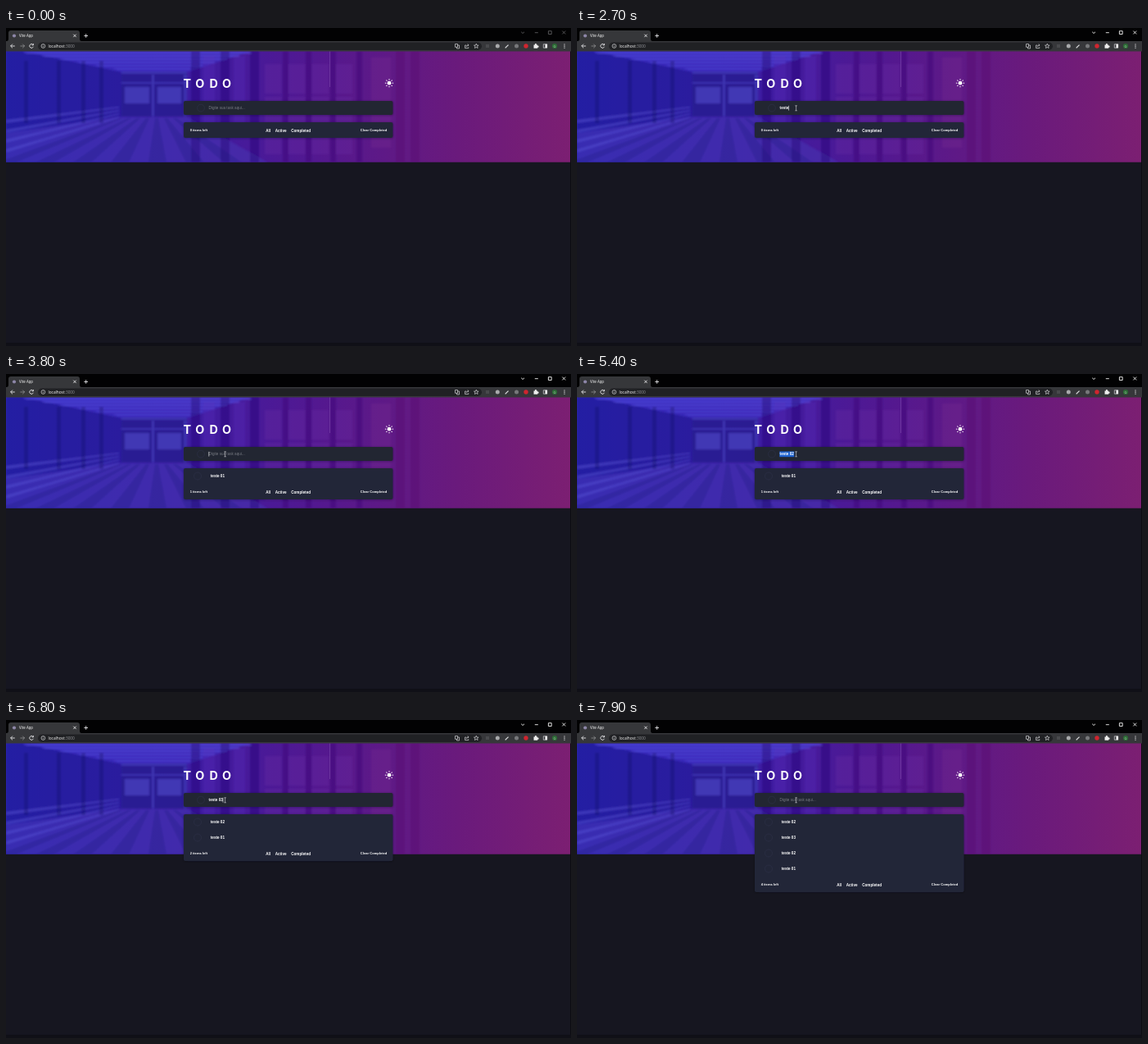
Write an HTML page that moves like this. It is 690x388 px and loops after 8 s.

```html
<!DOCTYPE html>
<html lang="en">
<head>
<meta charset="utf-8">
<title>Todo</title>
<style>
  html, body { margin: 0; height: 100%; overflow: hidden; background: #161620; }
  svg { display: block; width: 100vw; height: 100vh; }
  text { font: 700 4.62px "Liberation Sans", Arial, sans-serif; fill: #fff; white-space: pre; }
  .chrome text { font: 4.8px "Open Sans", sans-serif; }
  .line { fill: none; stroke: #e4e4e6; stroke-width: .9; }
  .small { font-size: 4.1px; }
  .ring { fill: none; stroke: #30334a; stroke-width: .6; }
  .title { font: 700 14.3px Inter, sans-serif; }
</style>
</head>
<body>
<svg viewBox="0 0 690 388" preserveAspectRatio="none">
  <defs>
    <linearGradient id="tint">
      <stop offset="0" stop-color="#2a21b0"/>
      <stop offset=".3" stop-color="#3b1ca4"/>
      <stop offset=".55" stop-color="#531890"/>
      <stop offset=".8" stop-color="#6a1a7c"/>
      <stop offset="1" stop-color="#7c1f72"/>
    </linearGradient>
    <filter id="soft"><feGaussianBlur stdDeviation=".8"/></filter>
    <filter id="shadow" x="-10%" y="-30%" width="120%" height="170%">
      <feDropShadow dx="0" dy=".5" stdDeviation="1.4" flood-color="#10101c" flood-opacity=".4"/>
    </filter>
    <clipPath id="hero"><path d="M0 28H690V163.7H0Z"/></clipPath>
  </defs>

  <rect width="690" height="388" fill="#161620"/>
  <rect y="384" width="690" height="4" fill="#101017"/>

  <g clip-path="url(#hero)">
    <rect y="28" width="690" height="136" fill="url(#tint)"/>
    <g id="hall" filter="url(#soft)"></g>
    <path d="M395.5 28V72" stroke="#a070c8" stroke-width=".7" opacity=".5"/>
  </g>
  <rect x="689" y="28" width="1" height="356" fill="#0c0c12"/>

  <g class="chrome">
    <rect width="690" height="16" fill="#020203"/>
    <path d="M1 16Q3 16 3 13V6Q3 3 6 3H87Q90 3 90 6V13Q90 16 92 16Z" fill="#36373a"/>
    <rect y="16" width="690" height="12.5" fill="#36373a"/>
    <rect x="39" y="17.5" width="542" height="9.4" rx="4.7" fill="#202124"/>
    <circle cx="10" cy="9.5" r="2.1" fill="#8d86a8"/>
    <text x="16" y="11.2" style="font-size:4.4px">Vite App</text>
    <path class="line" d="M82.3 7.7l3.4 3.4m0-3.4l-3.4 3.4"/>
    <path class="line" d="M10.8 22H5.6m2.4-2.4L5.6 22 8 24.4"/>
    <path class="line" stroke-opacity=".45" d="M17.4 22h5.2m-2.4-2.4l2.4 2.4-2.4 2.4"/>
    <path class="line" d="M33 20.4a2.4 2.4 0 1 0 .4 2.4M33.4 19v1.9h-1.9"/>
    <path class="line" d="M43 22a2.4 2.4 0 1 0 4.8 0a2.4 2.4 0 1 0-4.8 0M45.4 21.6v1.7m0-2.9v.5" style="stroke-width:.65"/>
    <text x="51.5" y="23.8">localhost<tspan fill="#96989c">:3000</tspan></text>
    <g class="line" style="stroke-width:.65">
      <path d="M548.5 19.5h3v3.8h-3zM551.5 21h2v4h-3v-1.7"/>
      <path d="M562 21h-1.4v3.6h4.2v-1.4m-2.8 0q0-2.4 3-2.4m-1.3-1.3l1.4 1.3-1.4 1.3"/>
      <path d="M574.3 19.2l.8 1.9 2 .1-1.5 1.3.5 2-1.8-1.1-1.8 1.1.5-2-1.5-1.3 2-.1z"/>
      <path d="M609.7 24.4l3.8-3.8" style="stroke-width:1.2"/>
      <path d="M656.3 19.8h4.4v4.4h-4.4z"/>
    </g>
    <path d="M658.5 19.8h2.2v4.4h-2.2z" fill="#fff"/>
    <rect x="586" y="20" width="4" height="4" fill="#48494c"/>
    <circle cx="600.3" cy="22" r="2.5" fill="#a9aaac"/>
    <circle cx="623.5" cy="22" r="2.5" fill="#77787b"/>
    <circle cx="635" cy="22" r="2.7" fill="#d0252f"/>
    <path d="M644.5 20.4h1.5a1 1 0 1 1 1.8 0h1.4v1.4a1 1 0 1 1 0 1.8v1.2h-4.7z" fill="#eee"/>
    <circle cx="670" cy="22" r="3.1" fill="#2c6b35"/>
    <text x="670" y="23.5" text-anchor="middle" style="font-size:4px;fill:#b9d8bc">G</text>
    <path d="M682 19.5v5.4" stroke="#eee" stroke-width="1.1" stroke-dasharray="1.1 1"/>
    <path class="line" d="M95.4 9.5h4.6m-2.3-2.3v4.6"/>
    <path id="controls" class="line" d="M629.2 4.8l1.9 1.7 1.9-1.7M645.8 5.7h4M662.4 3.7h3.8v3.8h-3.8zM679.4 3.6l3.8 3.8m0-3.8l-3.8 3.8"/>
  </g>

  <text class="title" x="216.5 231.2 248.6 264" y="73.2">TODO</text>
  <circle cx="468" cy="67.2" r="2.4" fill="#fff"/>
  <g id="rays" stroke="#fff" stroke-width="1"></g>

  <rect x="217" y="89" width="255.5" height="17" rx="2" fill="#222531" filter="url(#shadow)"/>
  <circle class="ring" cx="238" cy="97.6" r="4.4"/>
  <rect id="mark" x="247.3" y="94.4" height="6.8" fill="#1d62cf"/>
  <text id="entry" x="247.6" y="99.1"></text>
  <path id="caret" d="M0 94.8v5.8" stroke="#fff" stroke-width=".6"/>

  <rect id="card" x="217" y="115" width="255.5" rx="2" fill="#232639" filter="url(#shadow)"/>
  <g id="list"></g>
  <g id="footer">
    <text id="count" class="small" x="224.7" y="126"></text>
    <text x="317.2" y="127.2">All</text>
    <text x="328.7" y="127.2">Active</text>
    <text x="348.2" y="127.2">Completed</text>
    <text class="small" x="432.8" y="126">Clear Completed</text>
  </g>

  <g id="mouse">
    <path id="beam" d="M-1.3-3h2.6M0-3v6m-1.3 0h2.6" stroke="#d6d6da" stroke-width=".6"/>
    <path id="arrow" d="M0 0v8l1.9-1.7 1.2 2.7 1.2-.5-1.2-2.7h2.6z" fill="#fff" stroke="#000" stroke-width=".4"/>
  </g>
</svg>

<script>
const $ = id => document.getElementById(id);
const range = n => [...Array(n).keys()];
const LOOP = 8000, ROW = 19;

// Hall behind the header: [path, colour, opacity]
const bars = (xs, w, y, h) => xs.map(x => `M${x} ${y}h${w}v${h}h${-w}z`).join('');
const ceiling = range(6).map(i =>
  `M${20 + i * 22} ${29 + i * 4}H${300 - i * 15}v${2.4 - i * .2}H${26 + i * 22}Z`).join('');
const planks = range(7).map(i =>
  `M${138 + i * 11} 110h4L${i * 46 + 12} 164h-22Z`).join('');
const rails = range(4).map(i => `M0 ${112 + i * 12}L138 ${96 + i * 4}v1.4L0 ${116 + i * 12}Z`).join('');
const hall = [
  ['M0 28H20L141 53V108L0 128Z', '#1d1a8e', .4],
  ['M20 28H300L221 54H141Z', '#3f35cf', .45],
  [ceiling, '#5f58ea', .5],
  ['M0 128L138 109H222L320 164H0Z', '#4638b4', .5],
  [planks, '#221a86', .35],
  [rails, '#5a52d4', .45],
  [bars([22, 62, 92, 114], 5, 40, 76), '#17126c', .35],
  ['M141 53H221V108H141Z', '#241b8a', .7],
  ['M141 53H221V56H141ZM141 66H218V68H141ZM178 57H181V108H178ZM217 57H221V108H217Z', '#5048cc', .5],
  ['M145 72H175V92H145ZM185 72H214V92H185Z', '#5a54d6', .5],
  [bars([226, 262, 298], 11, 28, 136), '#260f78', .45],
  [bars([241, 278], 14, 34, 88), '#5a34be', .3],
  [bars([316, 345, 374, 403], 20, 44, 36) + bars([316, 345, 374, 403], 20, 84, 70), '#6c2fa6', .28],
  [bars([338, 366, 396, 428], 7, 28, 136), '#350f74', .4],
  [bars([446], 24, 36, 110), '#7d2d92', .25],
  [bars([476, 494], 11, 28, 136), '#4c1064', .25]
];
$('hall').innerHTML = hall.map(([d, c, o]) => `<path d="${d}" fill="${c}" opacity="${o}"/>`).join('');

$('rays').innerHTML = range(8).map(i =>
  `<path d="M3.7 0H5.1" transform="translate(468 67.2) rotate(${i * 45})"/>`).join('');

const typed = [
  [0, ''], [2300, 't'], [2400, 'te'], [2500, 'test'], [2700, 'teste'], [3000, 'teste '],
  [3100, 'teste 0'], [3300, 'teste 01'], [3800, ''], [4100, 't'], [4300, 'te'], [4400, 'tes'],
  [4600, 'test'], [4700, 'teste'], [4900, 'teste '], [5000, 'teste 0'], [5100, 'teste 02'],
  [5900, ''], [6300, 'teste 02'], [6700, 'teste 0'], [6800, 'teste 03'], [7100, ''],
  [7300, 'teste 02'], [7600, '']
];
const added = [[3800, 'teste 01'], [5900, 'teste 02'], [7100, 'teste 03'], [7600, 'teste 02']];
const past = (events, t) => events.filter(e => e[0] <= t).map(e => e[1]);
const show = (id, on) => $(id).setAttribute('visibility', on ? 'visible' : 'hidden');

function drawEntry(t) {
  const value = past(typed, t).pop(), entry = $('entry');
  const selected = t >= 5400 && t < 5900;
  entry.textContent = value || 'Digite sua task aqui...';
  entry.style.fill = value ? '#fff' : '#777a82';
  entry.style.fontWeight = value ? 700 : 400;
  const width = value ? entry.getComputedTextLength() : 0;
  $('mark').setAttribute('width', width + .8);
  show('mark', selected);
  $('caret').setAttribute('transform', `translate(${247.8 + width} 0)`);
  show('caret', t >= 1900 && t < 7900 && !selected);
}

function drawList(t) {
  const items = past(added, t).reverse(), n = items.length;
  $('card').setAttribute('height', ROW * (n + 1));
  $('list').innerHTML = items.map((name, i) =>
    `<circle class="ring" cx="234" cy="${124.5 + i * ROW}" r="4.5"/>
     <text x="249.8" y="${126.1 + i * ROW}">${name}</text>`).join('');
  $('footer').setAttribute('transform', `translate(0 ${n * ROW})`);
  $('count').textContent = `${n} items left`;
}

function drawMouse(t) {
  const p = Math.min(1, Math.max(0, (t - 1400) / 500)), rest = (1 - p) ** 2;
  const y = 97.8 + 20 * rest, inside = y < 106;
  $('mouse').setAttribute('transform', `translate(${267.6 + 60 * rest} ${y})`);
  show('beam', t >= 1400 && inside);
  show('arrow', t >= 1400 && !inside);
  $('controls').style.stroke = t < 1400 ? '#5c5c5e' : '#f4f4f4';
}

const start = performance.now();
let last = -1;
function frame(now) {
  const t = Math.floor(Math.max(0, now - start) % LOOP / 100) * 100;
  if (t !== last) {
    last = t;
    drawEntry(t);
    drawList(t);
    drawMouse(t);
  }
  requestAnimationFrame(frame);
}
frame(start);
</script>
</body>
</html>
```
